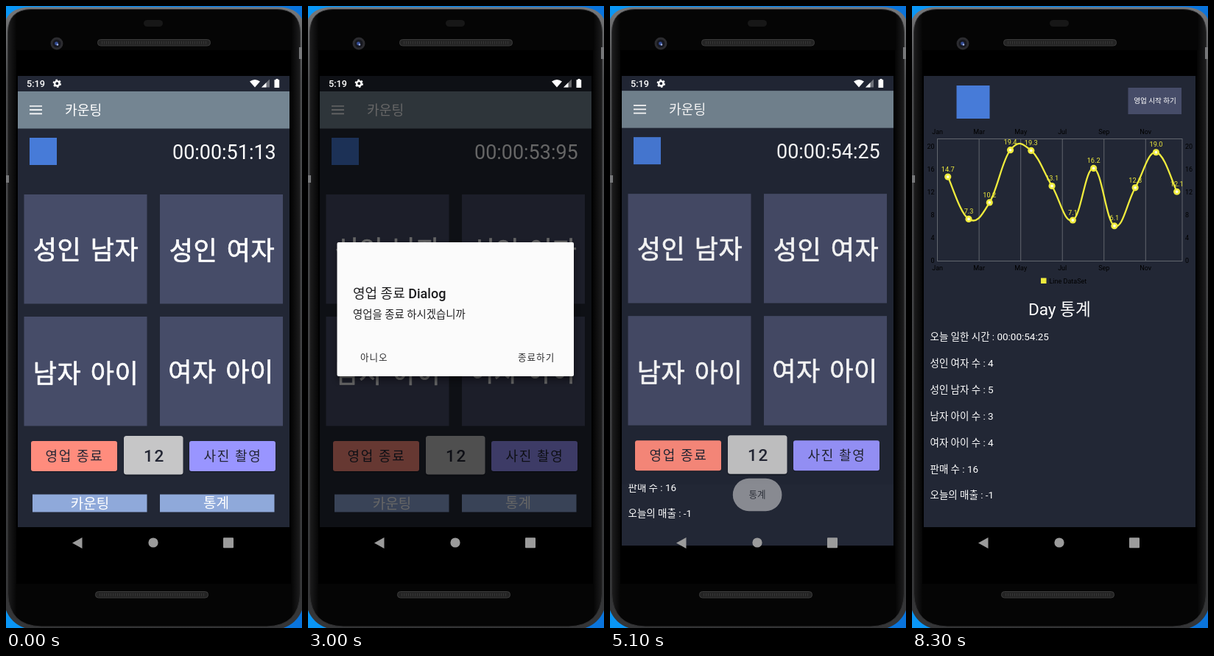
These frames come from a looping animation (402 px wide and 845 px high, 8.4 s). An HTML page:

```html
<!DOCTYPE html>
<html lang="ko">
<head>
<meta charset="utf-8">
<title>카운팅</title>
<style>
  html, body { margin: 0; width: 100%; height: 100%; overflow: hidden; background: #000; }
  svg { display: block; width: 100%; height: 100%; }
  text { font-family: Roboto, "Noto Sans CJK KR", "Noto Sans CJK", sans-serif; white-space: pre; }
  .mid { text-anchor: middle; }
  .med { font-weight: 500; }
  .wide { letter-spacing: 1.65px; }
  .action { font-size: 12.57px; letter-spacing: 1px; fill: #2c2c2e; }
  .heavy { stroke: #fff; stroke-width: .7px; stroke-linejoin: round; }
</style>
</head>
<body>
<svg viewBox="0 0 402 845" xmlns="http://www.w3.org/2000/svg">
  <defs>
    <linearGradient id="sky">
      <stop offset="0" stop-color="#0a97f6"/><stop offset="1" stop-color="#0a74dc"/>
    </linearGradient>
    <linearGradient id="rim" x2="0" y2="1">
      <stop offset="0" stop-color="#77787a"/><stop offset=".12" stop-color="#4a4b4d"/>
      <stop offset="1" stop-color="#343537"/>
    </linearGradient>
    <linearGradient id="edge">
      <stop offset="0" stop-color="#1d1d1e"/><stop offset=".03" stop-color="#050505"/>
      <stop offset=".97" stop-color="#050505"/><stop offset="1" stop-color="#1d1d1e"/>
    </linearGradient>
    <filter id="soft" x="-20%" y="-20%" width="140%" height="140%"><feGaussianBlur stdDeviation="5"/></filter>
    <clipPath id="reveal"><rect id="revealBox" x="16" y="95" width="369" height="640"/></clipPath>
    <clipPath id="endClip"><rect x="34" y="591" width="117" height="41" rx="3"/></clipPath>
    <clipPath id="statClip"><rect x="61" y="461" width="64" height="32" rx="2"/></clipPath>
    <clipPath id="quitClip"><rect x="275" y="461" width="70" height="32" rx="2"/></clipPath>
  </defs>

  <g id="phone">
    <rect width="402" height="845" fill="url(#sky)"/>
    <path d="M-4 34Q-2 2 32 1.500H370Q404 2 406 34V800Q404 846 356 849H46Q-2 846 -4 800Z" fill="url(#rim)"/>
    <path d="M2.500 36Q3 5 34 4.500H368Q399 5 399.500 36V798Q398 842 354 843H48Q4 842 2.500 798Z" fill="url(#edge)" stroke="#303031"/>
    <rect x="14" y="60" width="373" height="725" fill="#000"/>
    <path d="M0 230h4v10h-4zM398 56h4v16h-4z" fill="#77787a"/>
    <rect x="187" y="19" width="26" height="9" rx="4.500" fill="#171717"/>
    <g fill="#242424" stroke="#3b3b3b">
      <rect x="124.500" y="45.500" width="153" height="8.500" rx="4"/>
      <rect x="121.500" y="795.500" width="153" height="8.500" rx="4"/>
    </g>
    <path d="M130 49.700H272M127 799.700H269" stroke="#363636" stroke-width="4" stroke-dasharray="1 2"/>
    <circle cx="69" cy="51" r="8.500" fill="#2c2c30"/>
    <circle cx="69" cy="51" r="5.500" fill="#17181f"/>
    <circle cx="68.500" cy="51" r="2.400" fill="#344d96"/>
    <circle cx="70" cy="52.500" r="1.200" fill="#a8b8e8"/>
  </g>

  <rect x="16" y="95" width="369" height="613" fill="#222735"/>
  <g id="home">
    <rect x="16" y="116" width="369" height="50.500" fill="#748592"/>
    <path d="M32 136H49M32 141.200H49M32 146.400H49" stroke="#fff" stroke-width="1.700"/>
    <text x="80" y="147.500" font-size="18.200" fill="#fff">카운팅</text>
    <rect x="32" y="179" width="37" height="37" fill="#477bd8"/>
    <text id="timer" x="226" y="208.300" font-size="26.950" fill="#fff"></text>
    <g id="cells"></g>
    <g fill="#151924" opacity=".7">
      <rect x="33.500" y="593" width="118" height="40.500" rx="4"/>
      <rect x="159.500" y="586" width="81" height="52.500" rx="4"/>
      <rect x="248.500" y="593" width="118" height="40.500" rx="4"/>
    </g>
    <rect x="34" y="591" width="117" height="41" rx="3" fill="#ff8c7d"/>
    <circle id="endRipple" cx="92" cy="611" fill="#fff" clip-path="url(#endClip)"/>
    <rect x="160" y="584" width="80.500" height="52.500" rx="3.500" fill="#c6c6c7"/>
    <rect x="249" y="591" width="117" height="41" rx="3" fill="#9995ff"/>
    <g fill="#232634" class="mid wide">
      <text x="93" y="617.800" font-size="18">영업 종료</text>
      <text x="308" y="617.800" font-size="18">사진 촬영</text>
      <text x="201.500" y="619" font-size="22.500" class="med">12</text>
    </g>
    <rect x="36" y="663.500" width="155.500" height="24" fill="#8fa9da"/>
    <rect x="209" y="663.500" width="155.500" height="24" fill="#8fa9da"/>
    <g fill="#fff" class="mid med" font-size="19">
      <text x="114" y="682.800">카운팅</text>
      <text x="285.500" y="682">통계</text>
    </g>
  </g>
  <rect id="dim" x="16" y="95" width="369" height="613"/>

  <g id="status" fill="#fff">
    <text x="28" y="110" font-size="12.700" class="med">5:19</text>
    <circle cx="69.300" cy="105.300" r="3.200" fill="none" stroke="#fff" stroke-width="2.400"/>
    <circle cx="69.300" cy="105.300" r="4.800" fill="none" stroke="#fff" stroke-width="1.800" stroke-dasharray="2.500 2.526"/>
    <path d="M331 102.500Q338 97.500 345 102.500L338 110.500Z"/>
    <path d="M358 99.500V110.500H347Z" opacity=".35"/>
    <path d="M353.500 104V110.500H347Z"/>
    <path d="M366.500 99h3v1.200h1.700v10.800h-6.700v-10.800h2z"/>
  </g>

  <g id="ask">
    <rect x="40" y="326" width="321" height="182" opacity=".45" filter="url(#soft)"/>
    <rect x="39.500" y="321" width="321.500" height="182" rx="2" fill="#fbfbfb"/>
    <text x="61" y="396.700" font-size="18" class="med" fill="#1d1d1f">영업 종료 Dialog</text>
    <text x="61" y="424" font-size="14.400" fill="#222224">영업을 종료 하시겠습니까</text>
    <circle id="quitRipple" cx="310" cy="477" fill="#000" clip-path="url(#quitClip)"/>
    <text x="71" y="481.500" class="action">아니오</text>
    <text x="285" y="481.500" class="action">종료하기</text>
  </g>
  <g id="done">
    <rect x="40" y="326" width="321" height="182" opacity=".45" filter="url(#soft)"/>
    <rect x="39.500" y="321" width="321.500" height="182" rx="2" fill="#fdfdfd"/>
    <text x="61" y="396.700" font-size="18" class="med" fill="#1d1d1f">종료 Dialog</text>
    <text x="61" y="424" font-size="14.400" fill="#222224">영업 시간</text>
    <text x="64.500" y="442" font-size="14.400" fill="#222224">00:00:54:23</text>
    <circle id="statRipple" cx="93" cy="477" fill="#2c3440" clip-path="url(#statClip)"/>
    <text x="78" y="481.500" class="action">통계</text>
    <text x="285" y="481.500" class="action">종료하기</text>
  </g>

  <g id="statsWrap" clip-path="url(#reveal)">
    <g id="stats">
      <rect x="16" y="95" width="369" height="613" fill="#222735"/>
      <rect x="60.500" y="108" width="45" height="45" fill="#477bd8"/>
      <rect x="293.500" y="111" width="72.500" height="36" fill="#464c68"/>
      <text x="330" y="132.300" font-size="9.600" class="mid med" fill="#fff">영업 시작 하기</text>
      <g id="axes" font-size="9"></g>
      <path id="line" fill="none" stroke="#efeb3d" stroke-width="2.300"/>
      <g id="dots"></g>
      <rect x="175" y="369.500" width="7.500" height="7.500" fill="#efeb3d"/>
      <text x="186.500" y="376.500" font-size="9">Line DataSet</text>
      <text x="200.300" y="419.500" font-size="22.600" class="mid" fill="#fff">Day 통계</text>
      <g id="rows" font-size="13.470" fill="#fff"></g>
    </g>
  </g>

  <g fill="#9b9b9b">
    <path d="M90 729.500L103.500 722V737Z"/>
    <circle cx="200" cy="729" r="6.600"/>
    <rect x="295" y="722.300" width="14" height="14" rx="1"/>
  </g>
  <g id="toast">
    <rect x="166.800" y="641.800" width="66.600" height="44.400" rx="22" fill="#dcdcdd"/>
    <text x="200" y="668.300" font-size="12.570" class="mid" fill="#3a3b40">통계</text>
  </g>
</svg>
<script>
const LOOP = 8400, BASE = 346, UNIT = 7.75, LEFT = 34.6, STEP = 28.27;
const $ = id => document.getElementById(id);
const clamp = v => Math.max(0, Math.min(1, v));
const ramp = (t, from, to) => clamp((t - from) / (to - from));
const easeOut = p => 1 - (1 - p) ** 2;
const easeBoth = p => .5 - .5 * Math.cos(Math.PI * p);

function add(parent, tag, attrs, text) {
  const el = document.createElementNS("http://www.w3.org/2000/svg", tag);
  for (const k in attrs) el.setAttribute(k, attrs[k]);
  if (text !== undefined) el.textContent = text;
  return parent.appendChild(el);
}
function set(id, attrs) {
  for (const k in attrs) $(id).setAttribute(k, attrs[k]);
}

// cubic-bezier(.4, 0, .2, 1)
function fastOutSlowIn(x) {
  let lo = 0, hi = 1;
  for (let i = 0; i < 24; i++) {
    const s = (lo + hi) / 2, r = 1 - s;
    if (3 * r * r * s * .4 + 3 * r * s * s * .2 + s ** 3 < x) lo = s; else hi = s;
  }
  return lo * lo * (3 - 2 * lo);
}

[["성인 남자", 24.5, 256, 108.5, 343.5], ["성인 여자", 209, 256, 293.5, 345],
 ["남자 아이", 24.5, 422, 108.5, 511.5], ["여자 아이", 209, 422, 292, 510]]
  .forEach(([label, x, y, tx, ty]) => {
    add($("cells"), "rect", { x, y, width: 167, height: 148.5, fill: "#464c68" });
    add($("cells"), "text", { x: tx, y: ty, "font-size": 35, fill: "#fff", class: "mid med heavy",
      "letter-spacing": .6, "word-spacing": 3 }, label);
  });

["오늘 일한 시간 : 00:00:54:25", "성인 여자 수 : 4", "성인 남자 수 : 5", "남자 아이 수 : 3",
 "여자 아이 수 : 4", "판매 수 : 16", "오늘의 매출 : -1"]
  .forEach((row, i) => add($("rows"), "text", { x: 24.5, y: 454 + i * 35.9 }, row));

const axes = $("axes");
add(axes, "rect", { x: 34.5, y: 180.5, width: 332.5, height: 166, fill: "none", stroke: "#62666e" });
["Jan", "Mar", "May", "Jul", "Sep", "Nov"].forEach((month, i) => {
  const x = LEFT + i * 2 * STEP;
  if (i) add(axes, "path", { d: `M${x} 181V346`, stroke: "#62666e" });
  add(axes, "text", { x, y: 174, class: "mid" }, month);
  add(axes, "text", { x, y: 358.5, class: "mid" }, month);
});
for (let v = 0; v <= 20; v += 4) {
  const y = BASE + 3 - v * UNIT;
  add(axes, "text", { x: 30.5, y, "text-anchor": "end" }, v);
  add(axes, "text", { x: 371, y }, v);
}

const values = [14.7, 7.3, 10.2, 19.4, 19.3, 13.1, 7.1, 16.2, 6.1, 12.8, 19.0, 12.1];
const xs = values.map((_, i) => LEFT + (i + .5) * STEP);
const marks = values.map(v => {
  const g = add($("dots"), "g", {});
  add(g, "circle", { r: 4.6, fill: "#efeb3d" });
  add(g, "circle", { r: 1.9, fill: "#fffde0" });
  add(g, "text", { y: -7.3, "font-size": 9.2, class: "mid", fill: "#efeb3d" }, v.toFixed(1));
  return g;
});

function drawChart(phase) {
  const ys = values.map(v => BASE - v * UNIT * phase), last = values.length - 1;
  const slope = (a, i) => (a[Math.min(i + 1, last)] - a[Math.max(i - 1, 0)]) * .2;
  let d = `M${xs[0]} ${ys[0]}`;
  for (let i = 1; i <= last; i++) {
    d += `C${xs[i - 1] + slope(xs, i - 1)} ${ys[i - 1] + slope(ys, i - 1)} ` +
         `${xs[i] - slope(xs, i)} ${ys[i] - slope(ys, i)} ${xs[i]} ${ys[i]}`;
  }
  set("line", { d });
  marks.forEach((m, i) => m.setAttribute("transform", `translate(${xs[i]} ${ys[i]})`));
}

function drawTimer(t) {
  const c = Math.min(5425, 5113 + Math.floor(t * .094 + 1e-6));
  $("timer").textContent = `00:00:${Math.floor(c / 100)}:${String(c % 100).padStart(2, "0")}`;
}

function drawDialog(id, t, open, close) {
  const p = ramp(t, open, open + 150), s = .94 + .06 * easeOut(p);
  set(id, {
    opacity: p * (1 - ramp(t, close, close + 130)),
    transform: `translate(200 412) scale(${s}) translate(-200 -412)`
  });
}

function ripple(id, t, from, to, radius, alpha) {
  const p = ramp(t, from, from + 150);
  set(id, { r: radius * easeOut(p), opacity: p ? alpha * (1 - ramp(t, to, to + 150)) : 0 });
}

function draw(t) {
  drawTimer(t);
  ripple("endRipple", t, 1650, 1800, 64, .24);
  ripple("quitRipple", t, 3180, 3500, 38, .1);
  ripple("statRipple", t, 4500, 4800, 34, .12);
  drawDialog("ask", t, 1830, 3320);
  drawDialog("done", t, 3530, 4640);

  const slide = fastOutSlowIn(ramp(t, 5035, 5460));
  const shade = ramp(t, 1830, 2130) - ramp(t, 3320, 3527) + ramp(t, 3530, 3800) - ramp(t, 4620, 4800);
  set("dim", { opacity: .6 * shade + .1 * ramp(t, 5015, 5200) });
  set("home", { transform: `translate(0 ${-12.3 * slide})` });

  set("statsWrap", { visibility: t >= 5035 ? "visible" : "hidden" });
  set("stats", { transform: `translate(0 ${26.9 * (1 - slide)})` });
  set("revealBox", { y: 95 + 596 * (1 - slide) });
  drawChart(easeBoth(ramp(t, 5656, 6656)));
  set("toast", { opacity: ramp(t, 4990, 5190) * (1 - ramp(t, 7830, 8290)) });
}

let start;
function tick(now) {
  start ??= now;
  draw((now - start) % LOOP);
  requestAnimationFrame(tick);
}
draw(0);
requestAnimationFrame(tick);
</script>
</body>
</html>
```
